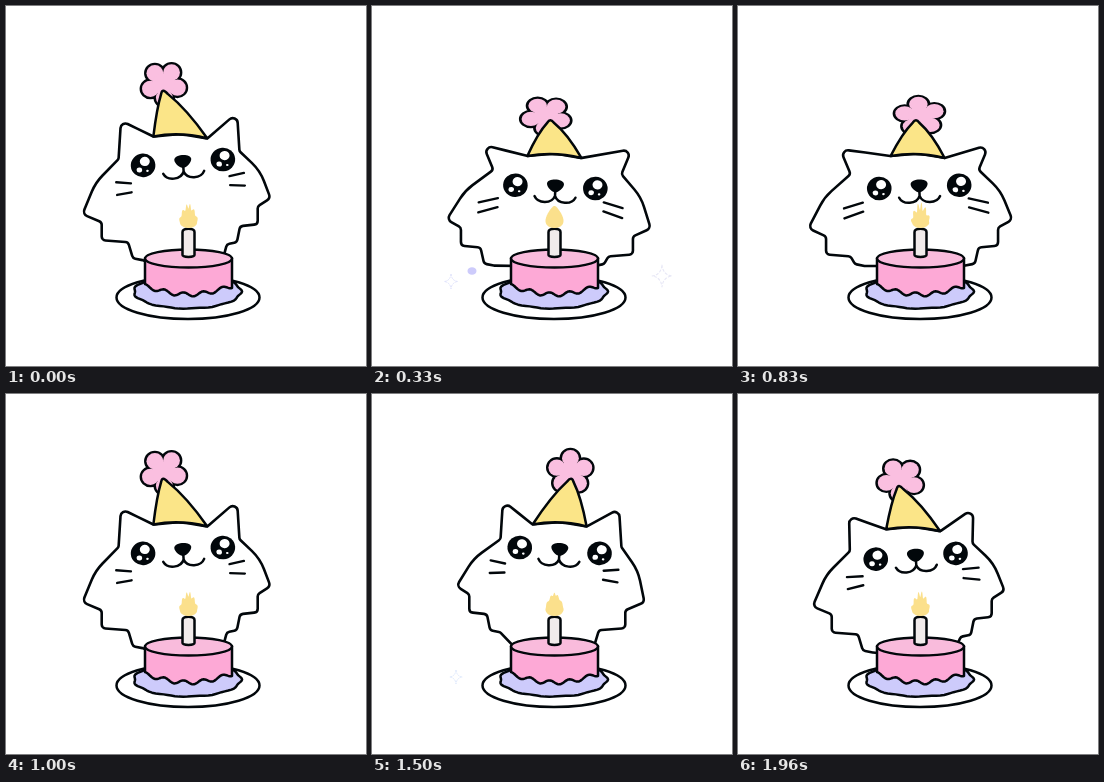
These frames come from a looping animation (360 px wide and 360 px high, 2000 ms). An HTML page with a canvas:

```html
<!DOCTYPE html>
<html lang="en">
<head>
<meta charset="utf-8">
<title>Birthday cat</title>
<style>
  html, body { margin: 0; width: 100%; height: 100%; overflow: hidden; background: #fff; }
  canvas { display: block; width: 360px; height: 360px; }
</style>
</head>
<body>
<canvas id="stage"></canvas>
<script>
const LOOP = 2000, SWAY = 1000, FRAME = LOOP / 48, PEAK = 52;
const INK = '#02070b', PINK = '#fabfe0', CAKE = '#fda9d6', CAKE_TOP = '#f9bbdc';
const LILAC = '#cdcbfb', YELLOW = '#fbe588', FLAME = '#fbe08c';
const RAD = Math.PI / 180, TAU = 2 * Math.PI;

const canvas = document.getElementById('stage');
const ctx = canvas.getContext('2d');
const dpr = window.devicePixelRatio || 1;
canvas.width = canvas.height = 360 * dpr;
ctx.scale(dpr, dpr);
ctx.lineJoin = ctx.lineCap = 'round';

function paint(fill, width, path, stroke = INK) {
  const target = path ? [path] : [];
  if (fill) { ctx.fillStyle = fill; ctx.fill(...target); }
  if (width) { ctx.lineWidth = width; ctx.strokeStyle = stroke; ctx.stroke(...target); }
}

const shape = (d, fill, width, stroke) => paint(fill, width, new Path2D(d), stroke);

function oval(x, y, rx, ry, fill, width) {
  ctx.beginPath();
  ctx.ellipse(x, y, rx, ry, 0, 0, TAU);
  paint(fill, width);
}

function at(x, y, draw) {
  ctx.save();
  ctx.translate(x, y);
  draw();
  ctx.restore();
}

// Line through point(u) for u from 0 to 1
function trace(point, steps = 80) {
  for (let i = 0; i <= steps; i++) ctx.lineTo(...point(i / steps));
}

// Closed outline of [x, y, corner radius]
function rounded(points) {
  const a = points[points.length - 1], b = points[0];
  ctx.beginPath();
  ctx.moveTo((a[0] + b[0]) / 2, (a[1] + b[1]) / 2);
  points.forEach(([x, y, r = 4], i) => {
    const [nx, ny] = points[(i + 1) % points.length];
    ctx.arcTo(x, y, nx, ny, r);
  });
  ctx.closePath();
}

// The cat sways once per second and squashes at each crossing
function poseAt(t) {
  const angle = TAU * (t - PEAK) / SWAY;
  const swing = lead => -Math.cos(angle + lead * RAD);
  const bounce = lag => (1 - Math.cos(2 * angle - lag * RAD)) / 2;
  return { angle, swing, lean: swing(0), tilt: swing(22), dip: bounce(0), squash: bounce(20) ** 1.5 };
}

// Half of the body, from ear to foot; dir is -1 for left, 1 for right
function bodySide(dir, { tilt, squash }) {
  const out = dir * tilt;
  const headX = 181 + 8 * tilt, bodyX = 174.5 + tilt;
  const ear = [headX + dir * (56 + 18.5 * squash), 107 + 34 * squash + 4 * out, 5];
  const base = [headX + dir * (60 + 4 * squash), 147 + 19 * squash + 4 * out];
  const tip = [bodyX + dir * (93 + 9 * squash + 3 * out), 198 + 20 * squash + 8 * out, 5];
  const cheek = [(base[0] + tip[0]) / 2 + 5 * dir, (base[1] + tip[1]) / 2 - 4, 50];
  const step = (dx, dy) => [tip[0] - dir * dx * (1 + 0.2 * out), Math.min(tip[1] + dy, 258)];
  const foot = step(42, 44);
  return [ear, base, cheek, tip, step(16, 8), step(16, 26), step(38, 28), foot,
    [foot[0] - dir * 10, foot[1] + 2], [182 + dir * 33, 260]];
}

function drawPom({ swing, squash }) {
  const turn = -109 + 33 * swing(-35);
  at(178 + 26 * swing(-20), 74 + 36 * squash, () => {
    ctx.scale(1 + 0.12 * squash, 1 - 0.14 * squash);
    for (const width of [4.8, 0]) {
      for (let i = 0; i < 5; i++) {
        const a = (turn + 72 * i) * RAD;
        oval(14 * Math.cos(a), 14 * Math.sin(a), 8.3, 8.3, PINK, width);
      }
    }
    oval(0, 0, 11, 11, PINK);
  });
}

function drawHat({ swing, squash }, x, y) {
  const tip = [178 + 25 * swing(-11), 78 + 34 * squash];
  const l = [x - 27, y], r = [x + 27, y + 2];
  const near = (p, f) => [tip[0] + (p[0] - tip[0]) * f, tip[1] + (p[1] - tip[1]) * f];
  const bend = (p, dx) => [(p[0] + tip[0]) / 2 + dx, (p[1] + tip[1]) / 2 - 4];
  ctx.beginPath();
  ctx.moveTo(...l);
  ctx.quadraticCurveTo(...bend(l, -1), ...near(l, 0.12));
  ctx.quadraticCurveTo(...tip, ...near(r, 0.12));
  ctx.quadraticCurveTo(...bend(r, 2), ...r);
  ctx.quadraticCurveTo(x, y - 5, ...l);
  paint(YELLOW, 2.5);
}

function drawEye(x) {
  at(x, 1, () => {
    oval(0, 0, 12.3, 11.8, INK);
    oval(2, -3.8, 5, 4.6, '#fff');
    oval(-4, 4.3, 2.8, 2.5, '#fff');
    oval(4, 5.8, 1.3, 1.1, '#fff');
  });
}

function drawFace({ lean, tilt, dip, squash }) {
  at(182.3 + 5.7 * lean, 152.5 + 28.5 * dip, () => {
    ctx.rotate(4.2 * RAD * tilt);
    drawEye(-40);
    drawEye(40);
    shape('M-8.5 -2C-8.5 -8 8.5 -8 8.5 -2C8.5 2 3 6.5 0 6.5C-3 6.5 -8.5 2 -8.5 -2Z', INK);
    shape('M0 5V10M-20.5 11C-17 18.5 -3 18.5 0 10C3 18.5 17 18.5 20.5 11', null, 2.5);
    for (const dir of [-1, 1]) {
      const x = dir < 0 ? 53 : 45, length = 14 + 5 * squash;
      const whisker = (y, rise) => shape(
        `M${dir * (x + 4 * squash)} ${y - 4 * squash}l${dir * length} ${rise}`, null, 2.4);
      whisker(18.5, -3 + 8 * squash);
      whisker(27.5, 1 + 5 * squash);
    }
  });
}

function drawCat(pose) {
  const hatX = 181 + 7 * pose.lean, hatY = 128 + 22 * pose.squash;
  rounded([[hatX - 27, hatY], [hatX, hatY - 2.5, 60], [hatX + 27, hatY + 2],
    ...bodySide(1, pose), ...bodySide(-1, pose).reverse()]);
  paint('#fff', 2.6);
  drawPom(pose);
  drawHat(pose, hatX, hatY);
  drawFace(pose);
}

function drawCake() {
  oval(182, 291.5, 71.5, 21.5, '#fff', 2.5);

  ctx.beginPath();
  trace(u => {
    const a = TAU * u, ripple = 1 + 0.02 * Math.cos(11 * a);
    return [181.5 + 53.5 * ripple * Math.cos(a), 285.5 + 17 * ripple * Math.sin(a)];
  });
  ctx.closePath();
  paint(LILAC, 2.5);

  ctx.beginPath();
  ctx.moveTo(139, 252);
  trace(u => [139 + 87 * u, 280 + 8.5 * Math.sin(Math.PI * u) - 2 * Math.cos(9 * Math.PI * u)]);
  ctx.lineTo(226, 252);
  paint(CAKE, 2.5);
  oval(182.5, 252.5, 43.5, 9, CAKE_TOP, 2.5);

  shape('M176.5 249V226C176.5 221.5 188.5 221.5 188.5 226V249C188.5 251.5 176.5 251.5 176.5 249Z', '#f1ebeb', 2.5);
}

function drawFlame({ angle }) {
  const ragged = 0.09 * (1 - Math.sin(angle));
  at(182.5, 222, () => {
    ctx.beginPath();
    trace(u => {
      const a = TAU * u, h = (1 - Math.cos(a)) / 2;
      const ripple = 1 + ragged * h * Math.cos(9 * a + angle);
      return [11 * Math.sin(a) * (1.1 - 0.7 * h) * ripple, -22 * h * ripple];
    });
    paint(FLAME);
  });
}

function star(x, y, size, color) {
  at(x, y, () => {
    ctx.scale(size, size);
    ctx.setLineDash([2, 2]);
    shape('M0 -10Q1 -1 9 0Q1 1 0 10Q-1 1 -9 0Q-1 -1 0 -10Z', null, 1, color);
  });
}

function drawSparkles(t) {
  const during = (from, to) => t >= from && t < to;
  if (during(280, 700)) {
    star(79, 275.5, 0.75, '#d9dbfa');
    star(290, 270, 1.1, '#e8e8f6');
  }
  if (during(280, 400)) oval(100, 265, 4.5, 3.8, LILAC);
  if (during(1430, 1560)) star(84, 283, 0.7, '#d6e2fb');
}

function draw(time) {
  const t = Math.floor(((time + 4) % LOOP) / FRAME) * FRAME;
  const pose = poseAt(t);
  ctx.fillStyle = '#fff';
  ctx.fillRect(0, 0, 360, 360);
  drawSparkles(t);
  drawCat(pose);
  drawCake();
  drawFlame(pose);
}

const start = performance.now();
function loop(now) {
  draw(Math.max(0, now - start));
  requestAnimationFrame(loop);
}
draw(0);
requestAnimationFrame(loop);
</script>
</body>
</html>
```
